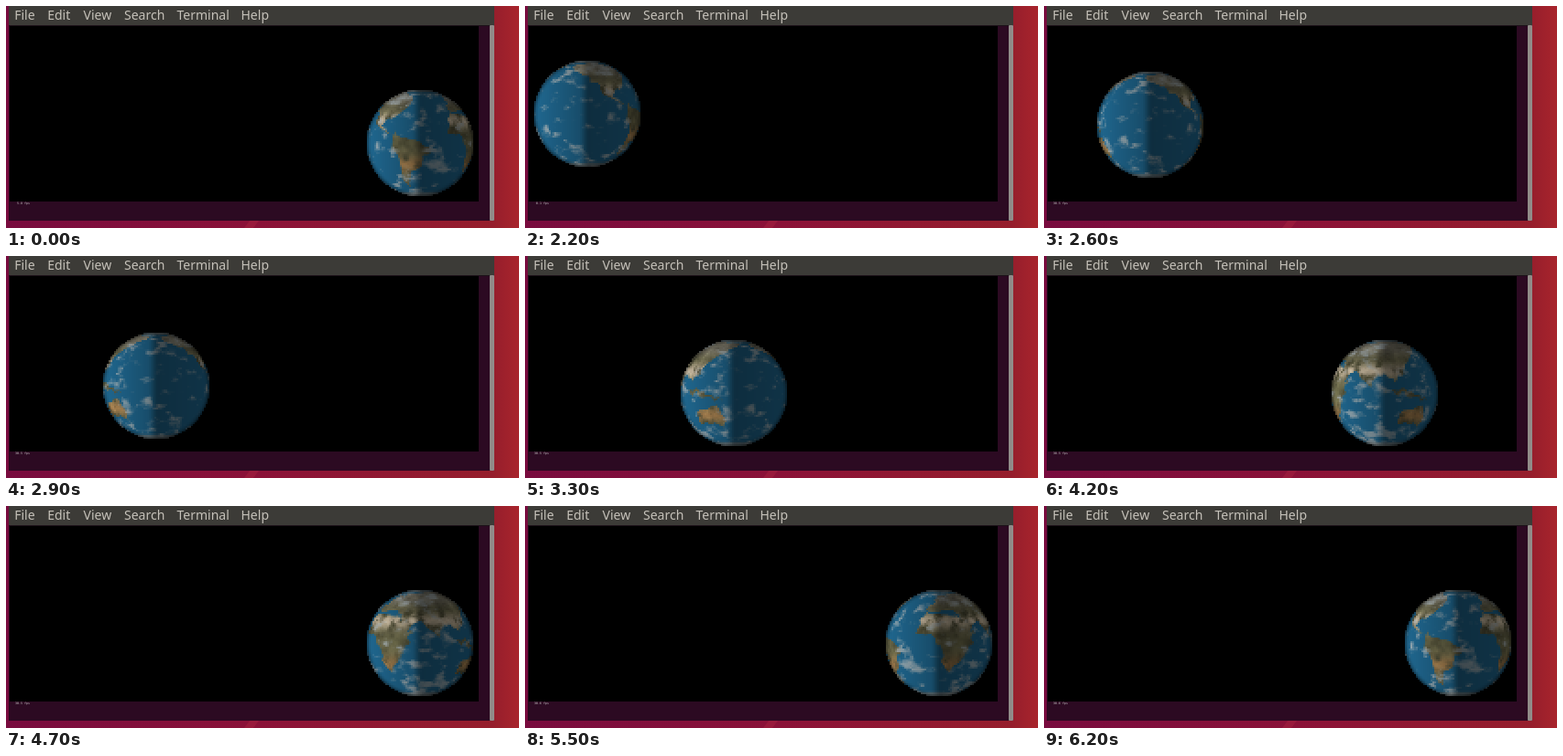
Recreate the animation shown at these times as an HTML page with a canvas. Size 560 by 243 pixels, loop 6.3 s.

```html
<!DOCTYPE html>
<html lang="en">
<head>
<meta charset="utf-8">
<title>Terminal globe</title>
<style>
  html, body { margin: 0; width: 100%; height: 100%; overflow: hidden; background: #7a0d3c; }
  svg { position: absolute; left: 0; top: 0; }
  canvas { position: absolute; left: 4px; top: 22px; width: 512px; height: 192px; image-rendering: pixelated; }
  .menu { font: 14px "Noto Sans", "Open Sans", sans-serif; fill: #c5c1b9; }
  .fps { font: 3.33px "DejaVu Sans Mono", monospace; fill: #c8c4c6; white-space: pre; }
</style>
</head>
<body>
<svg width="560" height="243" viewBox="0 0 560 243">
  <defs>
    <linearGradient id="desk">
      <stop offset="0" stop-color="#780b3e"/>
      <stop offset=".5" stop-color="#8b1238"/>
      <stop offset=".95" stop-color="#961e2c"/>
      <stop offset="1" stop-color="#a8242c"/>
    </linearGradient>
  </defs>
  <rect width="560" height="243" fill="url(#desk)"/>
  <path d="M266 235h10l-6 8h-10z" fill="#981a3c"/>
  <rect x="3" width="530" height="235" fill="#2c0a22"/>
  <rect x="3" width="530" height="21" fill="#3c3b37"/>
  <rect x="3" y="21" width="525" height="1" fill="#1c1018"/>
  <rect x="4" y="22" width="512" height="191" fill="#000"/>
  <rect x="528" y="21" width="5" height="214" rx="1" fill="#918c89"/>
  <g class="menu">
    <text x="9.2" y="15">File</text>
    <text x="45.2" y="15">Edit</text>
    <text x="84.5" y="15">View</text>
    <text x="129" y="15">Search</text>
    <text x="186.5" y="15">Terminal</text>
    <text x="256.5" y="15">Help</text>
  </g>
  <text id="fps" class="fps" x="10" y="217"></text>
</svg>
<canvas id="screen" width="256" height="96"></canvas>
<script>
const LOOP = 6300, STEP = 100, HOLD = 2200, LAST = 39;
const MAP_W = 720, MAP_H = 360, RADIUS = 29.3;
const RAD = Math.PI / 180;
const screen = document.getElementById('screen').getContext('2d');
const fpsLabel = document.getElementById('fps');

const clamp = (v, a = 0, b = 1) => Math.min(b, Math.max(a, v));
const mix = (a, b, k) => a + (b - a) * k;
const blend = (from, to, k) => from.map((v, c) => mix(v, to[c], k));
const smooth = (a, b, v) => { const k = clamp((v - a) / (b - a)); return k * k * (3 - 2 * k); };

function hash(x, y, z) {
  const s = Math.sin(x * 127.1 + y * 311.7 + z * 74.7) * 43758.5453;
  return s - Math.floor(s);
}

function noise(x, y, z) {
  const ix = Math.floor(x), iy = Math.floor(y), iz = Math.floor(z);
  const u = smooth(0, 1, x - ix), v = smooth(0, 1, y - iy), w = smooth(0, 1, z - iz);
  const row = (j, k) => mix(hash(ix, iy + j, iz + k), hash(ix + 1, iy + j, iz + k), u);
  return mix(mix(row(0, 0), row(1, 0), v), mix(row(0, 1), row(1, 1), v), w);
}

const fbm = (x, y, z) =>
  (noise(x, y, z) * 4 + noise(x * 2.1, y * 2.1, z * 2.1) * 2 + noise(x * 4.3, y * 4.3, z * 4.3)) / 7;

// Key corners as longitude,latitude; noise roughens the coasts between them
const CONTINENTS = {
  northAmerica: 'M-165,66 -95,74 -58,54 -81,28 -97,22 -79,8 -108,22 -124,42z',
  southAmerica: 'M-77,10 -36,-6 -58,-38 -70,-55 -72,-18 -81,-5z',
  africa: 'M-8,35 32,31 50,11 38,-18 20,-35 9,4 -16,12z',
  eurasia: 'M-9,38 8,60 100,77 178,67 122,32 108,12 90,22 78,8 60,25 45,13 34,32 28,38z',
  indonesia: 'M98,4 118,4 150,-9 120,-3z',
  australia: 'M114,-22 142,-11 153,-29 145,-38 116,-34z'
};

function landMask() {
  const canvas = document.createElement('canvas');
  canvas.width = MAP_W;
  canvas.height = MAP_H;
  const g = canvas.getContext('2d', { willReadFrequently: true });
  g.setTransform(MAP_W / 360, 0, 0, -MAP_H / 180, MAP_W / 2, MAP_H / 2);
  g.filter = 'blur(1px)';
  for (const outline of Object.values(CONTINENTS)) g.fill(new Path2D(outline));
  const { data } = g.getImageData(0, 0, MAP_W, MAP_H);
  return (i, j) => data[(clamp(Math.round(j), 0, MAP_H - 1) * MAP_W + clamp(Math.round(i), 0, MAP_W - 1)) * 4 + 3] / 255;
}

const OCEAN = [30, 98, 136], FOREST = [96, 94, 66], STEPPE = [124, 120, 104];
const SAND = [182, 168, 144], OUTBACK = [150, 116, 72], ICE = [140, 144, 142], CLOUD = [165, 175, 178];

function surface(lat, x, y, z, land) {
  const rough = fbm(x * 7 + 40, y * 7, z * 7);
  const dry = Math.exp(-(((Math.abs(lat) - 24) / 9) ** 2)) * smooth(.25, .55, rough);
  let ground = blend(FOREST, STEPPE, smooth(34, 56, lat));
  ground = blend(ground, lat > 0 ? SAND : OUTBACK, dry);
  ground = ground.map(v => v * mix(.65, 1.35, rough));
  const ice = Math.max(smooth(66, 80, lat), smooth(62, 72, -lat)) * .8;
  const storm = .06 * smooth(35, 58, Math.abs(lat));
  const cloud = smooth(.52, .8, fbm(x * 5 + 9, y * 5 + 5, z * 8 + 3) + storm) * .8;
  return blend(blend(blend(OCEAN, ground, land), ICE, ice), CLOUD, cloud);
}

function buildMap() {
  const landAt = landMask(), map = [];
  for (let j = 0; j < MAP_H; j++) {
    const lat = 90 - (j + .5) * 180 / MAP_H;
    const ring = Math.cos(lat * RAD), z = Math.sin(lat * RAD);
    for (let i = 0; i < MAP_W; i++) {
      const lon = (i + .5) * 360 / MAP_W * RAD;
      const x = Math.cos(lon) * ring, y = Math.sin(lon) * ring;
      const warp = seed => (noise(x * 9 + seed, y * 9, z * 9) - .5) * 16;
      map.push(surface(lat, x, y, z, landAt(i + warp(20), j + warp(70))));
    }
  }
  return map;
}

const map = buildMap();

function drawGlobe(cx, cy, centerLon) {
  const frame = screen.createImageData(256, 96);
  for (let row = 0; row < 96; row++) {
    for (let col = 0; col < 256; col++) {
      const at = (row * 256 + col) * 4;
      frame.data[at + 3] = 255;
      const x = (col + .5 - cx) / RADIUS, y = (cy - row - .5) / RADIUS;
      const rest = 1 - x * x - y * y;
      if (rest < 0) continue;
      const z = Math.sqrt(rest);
      const lon = centerLon + Math.atan2(x, z) / RAD;
      const lat = Math.asin(y) / RAD;
      const u = Math.floor((((lon + 180) % 360 + 360) % 360) * MAP_W / 360) % MAP_W;
      const v = clamp(Math.floor((90 - lat) * MAP_H / 180), 0, MAP_H - 1);
      const day = .74 - .32 * x, night = .46 + .06 * x;
      const light = mix(day, night, smooth(-.16, .04, x)) * mix(.4, 1, smooth(0, .45, z));
      map[v * MAP_W + u].forEach((value, c) => { frame.data[at + c] = value * light; });
    }
  }
  screen.putImageData(frame, 0, 0);
}

// Rendered steps, with stalls at 2500, 4000 and 4800 ms
function stepAt(t) {
  if (t < HOLD) return LAST;
  const i = Math.floor((t - HOLD) / STEP);
  return i - (i >= 3) - (i === 18) - (i >= 26);
}

function fpsAt(n) {
  if (n === LAST) return ' 5.8';
  if (n < 3) return ' 0.1';
  return n < 25 ? '30.5' : '30.6';
}

let shown = -1;
function update(t) {
  const n = stepAt(t);
  if (n === shown) return;
  shown = n;
  drawGlobe(Math.min(32 + 8 * n, 224), Math.min(48 + 2 * n, 64), -127 - 7.2 * n);
  fpsLabel.textContent = fpsAt(n) + ' fps';
}

const start = performance.now();
function tick() {
  update((performance.now() - start) % LOOP);
  requestAnimationFrame(tick);
}
tick();
</script>
</body>
</html>
```
